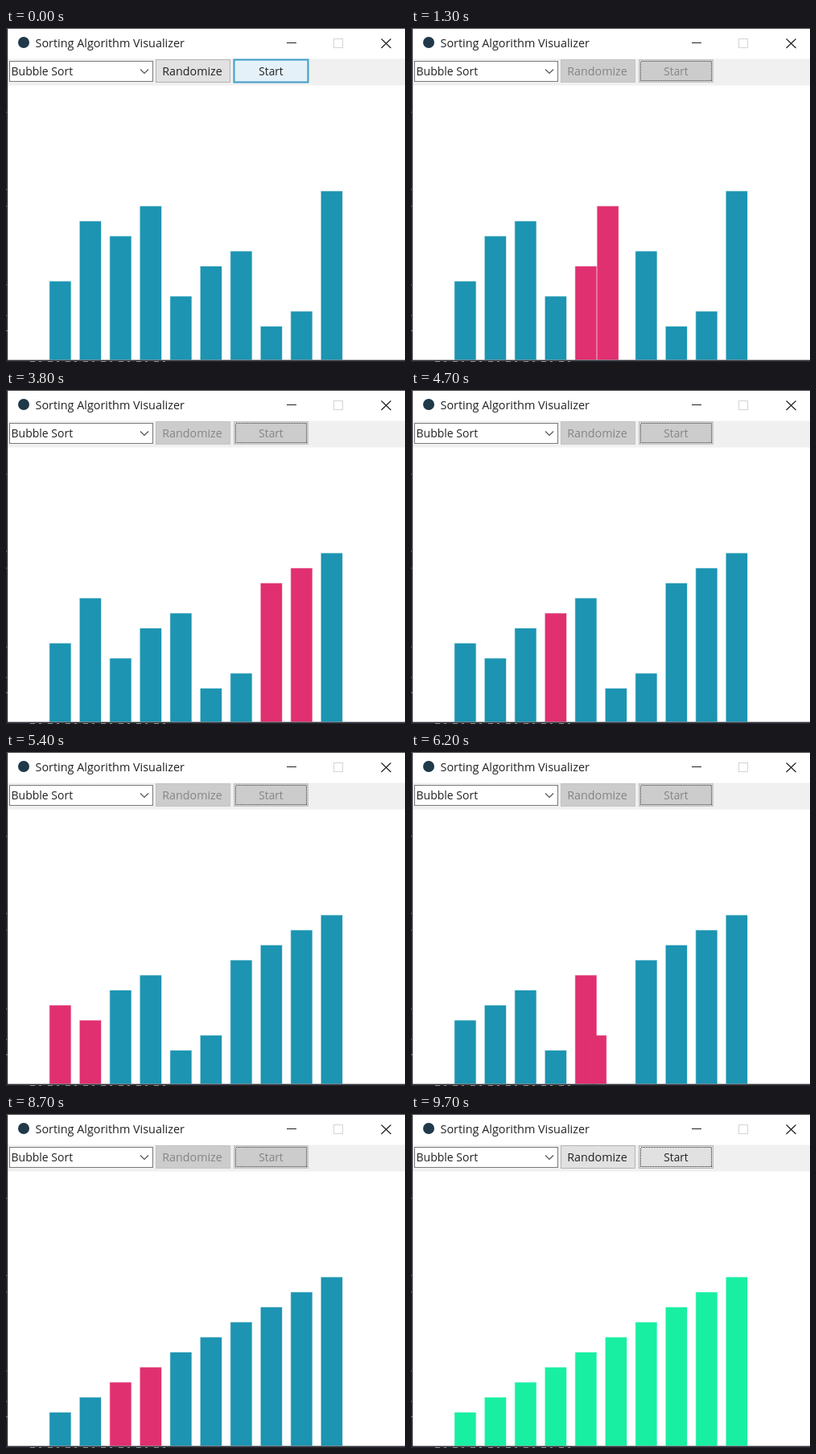
Animation of 496x416 px, one loop 9.8 s. Source, as an HTML page:

```html
<!DOCTYPE html>
<html lang="en">
<head>
<meta charset="utf-8">
<title>Sorting Algorithm Visualizer</title>
<style>
  html, body { margin: 0; width: 100%; height: 100%; overflow: hidden; background: #fff; }
  svg { display: block; width: 496px; height: 416px; font: 14px "Open Sans", "Noto Sans", sans-serif; }
  .button rect { fill: #e1e1e1; stroke: #b4b4b4; }
  .button text { text-anchor: middle; fill: #222; }
  .button .focus { display: none; fill: none; stroke: #222; stroke-dasharray: 1 1; shape-rendering: crispEdges; }
  .hover rect { fill: #e4f1f9; stroke: #3c9cc4; stroke-width: 2; }
  .focused .focus { display: inline; }
  .disabled rect { fill: #ccc; stroke: #c4c4c4; }
  .disabled .focus { fill: none; stroke: #444; }
  .disabled text { fill: #858585; }
  #bars rect { stroke-width: 1.2; stroke-opacity: .35; }
</style>
</head>
<body>
<svg viewBox="0 0 496 416">
  <rect width="496" height="416" fill="#fff"/>
  <path d="M0 .5H496" stroke="#444"/>
  <circle cx="22" cy="18" r="7" fill="#20394a"/>
  <text x="36.500" y="24" font-size="14.4" fill="#222">Sorting Algorithm Visualizer</text>
  <g fill="none" stroke="#222" stroke-width="1.2">
    <path d="M349 18.5h12M466.500 13.500l12 11.500m0-11.500l-12 11.500"/>
    <rect x="407.500" y="13.500" width="11" height="11" stroke="#d8d8d8"/>
  </g>

  <rect x="2" y="38.500" width="494" height="33" fill="#f0f0f0"/>
  <rect x="4.500" y="41.500" width="178" height="25" fill="#fff" stroke="#7a7a7a"/>
  <text x="6.500" y="59" fill="#222">Bubble Sort</text>
  <path d="M167 51.500l5 5 5-5" fill="none" stroke="#555" stroke-width="1.2"/>
  <g class="button" id="randomize">
    <rect x="186.500" y="39.500" width="92" height="28"/>
    <text x="231.500" y="59" font-size="14.3">Randomize</text>
  </g>
  <g class="button" id="start">
    <rect x="283.500" y="39.500" width="92" height="28"/>
    <rect class="focus" x="285.500" y="41.500" width="88" height="24"/>
    <text x="329.500" y="59" font-size="13.700">Start</text>
  </g>

  <g id="bars"></g>

  <path d="M1 1V416M0 414.700H496" stroke="#2b2b33" stroke-width="2.400"/>
  <path d="M30 415.500H200" stroke="#999" stroke-dasharray="6 5 3 8"/>
  <path d="M0 105h1M0 201h1M0 222h1M0 320h1M0 358h1M0 377h2" stroke="#999"/>
</svg>
<script>
const LOOP = 9800, TICK = 100, PRESS = 300, SORT = 365;
const COMPARE = 140, SWAP = 100, SWEEP = 50;
const TEAL = '#1c94b2', PINK = '#e03070', GREEN = '#18efa2';
const BOTTOM = 413, GAP = 37.5, REPAINT = 257;
const first = [4, 8, 7, 9, 3, 5, 6, 1, 2, 10];
const $ = id => document.getElementById(id);

const slotX = i => 54.3 + GAP * i;
const topOf = value => 371.9 - 18.72 * (value - 1);
const ramp = (t, from, to) => Math.min(1, Math.max(0, (t - from) / (to - from)));

function addRect() {
  const rect = document.createElementNS('http://www.w3.org/2000/svg', 'rect');
  rect.setAttribute('width', 26.2);
  return $('bars').appendChild(rect);
}

function place(rect, x, y, color) {
  rect.setAttribute('x', x);
  rect.setAttribute('y', y);
  rect.setAttribute('height', BOTTOM - y);
  rect.setAttribute('fill', color);
  rect.setAttribute('stroke', color);
}

// Every comparison, with the order of the bars before it
const steps = [];
const order = [...first];
let end = SORT;
for (let last = 9; last > 0; last--) {
  for (let j = 0; j < last; j++) {
    const swap = order[j] > order[j + 1];
    const length = COMPARE + (swap ? SWAP : 0);
    steps.push({ start: end, length, j, swap, order: [...order] });
    if (swap) [order[j], order[j + 1]] = [order[j + 1], order[j]];
    end += length;
  }
}
const sweepEnd = end + 10 * SWEEP;

const bars = first.map(addRect);
const lag = addRect();

function drawBars(t) {
  const step = steps.find(s => t >= s.start && t < s.start + s.length);
  const values = step ? step.order : t < SORT ? first : order;
  lag.setAttribute('visibility', 'hidden');
  values.forEach((value, i) => {
    let x = slotX(i), color = TEAL;
    if (t >= end + i * SWEEP) color = GREEN;
    if (step && (i === step.j || i === step.j + 1)) {
      const age = t - step.start, left = i === step.j;
      color = left && age > step.length - 15 ? TEAL : PINK;
      // The right bar moves first, then the left one
      if (step.swap) x += GAP * (left ? ramp(age, 135, 190) : -ramp(age, 78, 133));
      // A tall right bar is repainted from below
      if (!left && age < 50 && topOf(value) < REPAINT) {
        color = TEAL;
        place(lag, x, REPAINT, PINK);
        lag.setAttribute('visibility', 'visible');
      }
    }
    place(bars[i], x, topOf(value), color);
  });
}

function draw(now) {
  const t = Math.floor(now % LOOP / TICK) * TICK;
  const busy = t >= PRESS && t < sweepEnd ? ' disabled' : '';
  $('randomize').setAttribute('class', 'button' + busy);
  $('start').setAttribute('class', 'button' + busy + (t < PRESS ? ' hover' : ' focused'));
  drawBars(t);
}

const begin = performance.now();
function frame() {
  draw(performance.now() - begin);
  requestAnimationFrame(frame);
}
frame();
</script>
</body>
</html>
```
